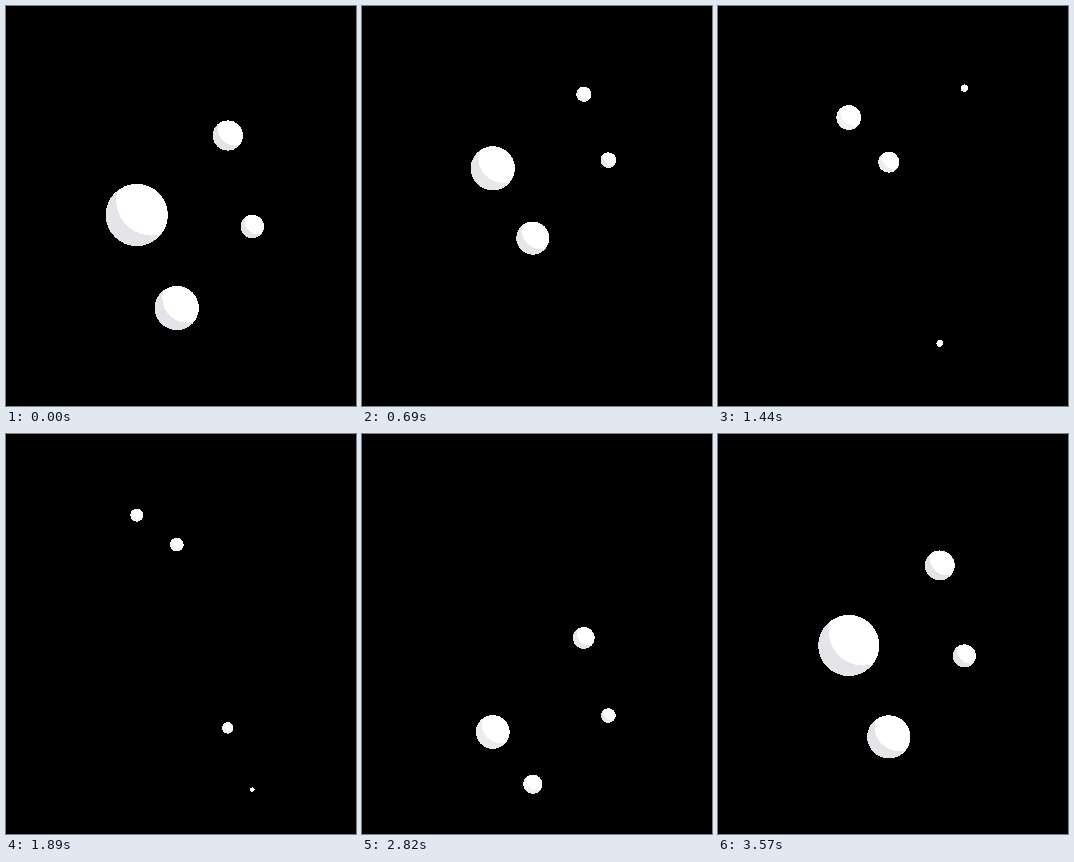
An HTML page that plays this animation: 350 px wide and 400 px high, repeating every 3600 ms.

```html
<!DOCTYPE html>
<html lang="en">
<head>
<meta charset="utf-8">
<title>Rising bubbles</title>
<style>
  html, body { margin: 0; width: 100%; height: 100%; overflow: hidden; background: #000; }
  svg { display: block; width: 100vw; height: 100vh; }
</style>
</head>
<body>
<svg id="stage" viewBox="0 0 350 400" shape-rendering="crispEdges"></svg>
<script>
const LOOP = 3600, STEP = 30, MIN = 0.11;
const EDGE = 0.4;   // hard rim added to every radius
const SETTLE = 1;   // a bubble returns this far above its rest height
const SHADE = [229, 228, 232];
const CRESCENT = 'M-.618-.786A1 1 0 1 0 .786 .618A1.14 1.14 0 0 1-.618-.786Z';

// Each bubble shrinks from rest to top, wraps to bottom at `wrap`, then grows back to rest.
const bubbles = [
  { x: 130.8, r: 30.7, rest: 209,   top: 66.9, bottom: 381,   wrap: 2100 },
  { x: 221.8, r: 14.7, rest: 129.5, top: 57.8, bottom: 360.6, wrap: 1200 },
  { x: 170.8, r: 21.7, rest: 302,   top: 58.9, bottom: 376.7, wrap: 2400 },
  { x: 246.4, r: 11.3, rest: 220.5, top: 47.5, bottom: 362.7, wrap: 1800 }
];

const stage = document.getElementById('stage');
const lerp = (a, b, k) => a + (b - a) * k;

function add(parent, tag, attrs = {}) {
  const el = document.createElementNS('http://www.w3.org/2000/svg', tag);
  for (const key in attrs) el.setAttribute(key, attrs[key]);
  return parent.appendChild(el);
}

for (const b of bubbles) {
  b.group = add(stage, 'g');
  add(b.group, 'circle', { r: 1, fill: '#fff' });
  b.shade = add(b.group, 'path', { d: CRESCENT });
}

function draw(t) {
  for (const b of bubbles) {
    const leaving = t < b.wrap;
    const k = leaving ? 1 - t / b.wrap : (t - b.wrap) / (LOOP - b.wrap);
    const y = leaving ? lerp(b.top, b.rest, k) : lerp(b.bottom, b.rest - SETTLE, k);
    const size = b.r * lerp(MIN, 1, k) + EDGE;
    b.group.setAttribute('transform', `translate(${b.x} ${y}) scale(${size})`);
    // The shadow fades towards white as the bubble shrinks.
    const depth = 1 - (1 - k) ** 2;
    const tone = SHADE.map(c => Math.round(lerp(255, c, depth)));
    b.shade.setAttribute('fill', `rgb(${tone})`);
  }
}

const start = performance.now();
function tick() {
  const t = (performance.now() - start) % LOOP;
  draw(Math.floor(t / STEP) * STEP);
  requestAnimationFrame(tick);
}
tick();
</script>
</body>
</html>
```
